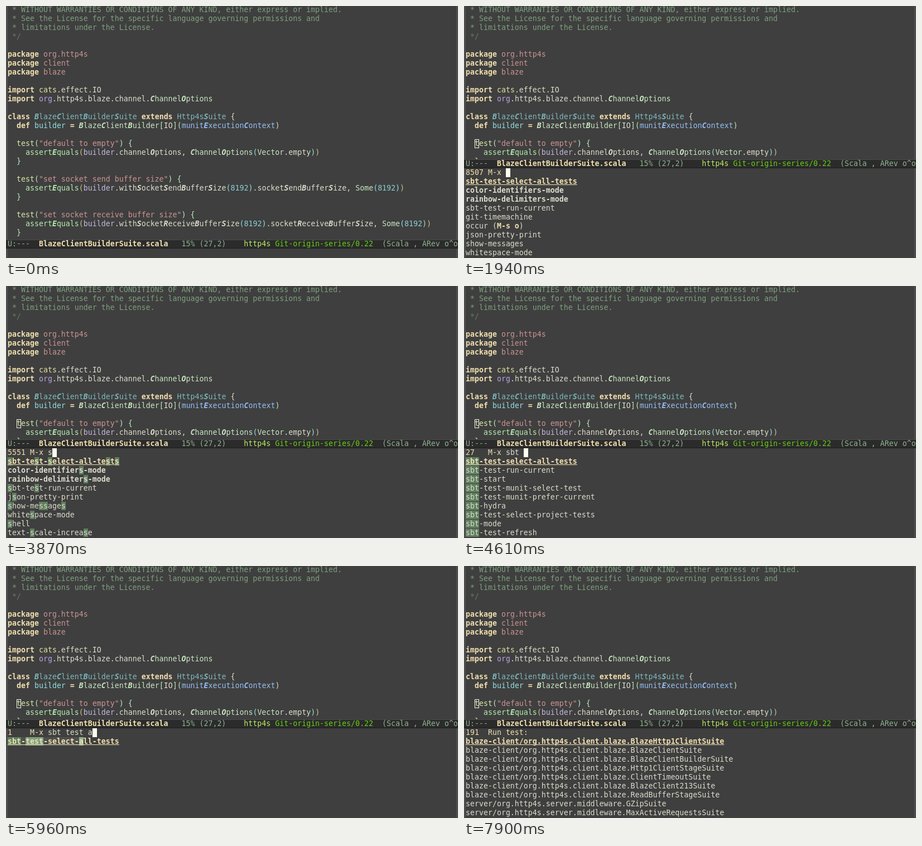
Recreate the animation shown at these times as an HTML page. Size 810 px wide and 452 px high, loop 8000 ms.

```html
<!DOCTYPE html>
<html lang="en">
<head>
<meta charset="utf-8">
<title>Running a test from the editor</title>
<style>
  html, body { margin: 0; width: 100%; height: 100%; overflow: hidden; background: #3f3f3f; }
  #stage { position: relative; width: 810px; height: 452px; overflow: hidden; background: #3f3f3f; }
  pre, .fringe, .edge, #point { position: absolute; margin: 0; }
  pre {
    font: 13.289px/16px "DejaVu Sans Mono", monospace;
    font-variant-ligatures: none;
    color: #dcdccc;
  }
  #code { left: 3px; top: -1px; }
  #mode {
    left: 0; width: 807px; height: 16px; padding-left: 3px; overflow: hidden;
    background: #2b2b2b; color: #8fb28f;
    box-shadow: inset 0 1px #4c4c4c, inset 0 -1px #1c1c1c;
  }
  #mini { left: 0; width: 807px; height: 180px; padding-left: 3px; background: #3f3f3f; }
  .fringe { top: 0; width: 3px; height: 452px; background: #4f4f4f; }
  .edge { left: 0; top: 451px; width: 810px; height: 1px; background: #463c3e; }

  /* syntax colours */
  i { font-style: normal; }
  em { font-style: italic; font-weight: bold; }
  b, .key { color: #f0dfaf; font-weight: bold; }
  .doc { color: #7f9f7f; }
  .end { color: #5f7f5f; }
  .str { color: #cc9393; }
  .type { color: #7cb8bb; }
  .def { color: #93e0e3; }
  .org { color: #b8a2e6; }
  .cats { color: #e2e0a4; }
  .opt { color: #c9e6c3; }
  .ctx { color: #94bff3; }
  .test { color: #d6e8a6; }
  .call { color: #b4ecae; }
  .obj { color: #c3b9dc; }
  .num { color: #8cd0d3; }
  .p2 { color: #bfebbf; }
  .p3 { color: #d0bf8f; }
  .p4 { color: #93e0e3; }
  .proj { color: #bdee62; }
  .git { color: #66cc14; }

  /* cursors */
  #point { left: 19px; top: 239px; width: 8px; height: 16px; box-sizing: border-box; }
  #point.hollow { border: 1px solid #ffffef; }
  #point.solid { background: #ffffef; }
  #point.solid::after {
    content: "t"; color: #3f3f3f;
    font: 13.289px/16px "DejaVu Sans Mono", monospace;
  }
  .caret { display: inline-block; width: 8px; height: 16px; vertical-align: top; }
  .caret.on { background: #ffffef; }

  /* candidates */
  .prompt { color: #f0dfaf; }
  .bold { font-weight: bold; }
  .pick { color: #f0dfaf; font-weight: bold; text-decoration: underline 1px; text-decoration-skip-ink: none; }
  .gap { background: #4f4f4f; }
  .m1 { background: #5f7f5f; }
  .m2 { background: #7f9f7f; }
  .m3 { background: #8fb28f; }
</style>
</head>
<body>
<div id="stage">
<pre id="code"><i class="doc"> * WITHOUT WARRANTIES OR CONDITIONS OF ANY KIND, either express or implied.
 * See the License for the specific language governing permissions and
 * limitations under the License.
</i><i class="end"> */</i>

<b>package</b> <i class="str">org.http4s</i>
<b>package</b> <i class="str">client</i>
<b>package</b> <i class="str">blaze</i>

<b>import</b> <i class="cats">cats</i>.effect.IO
<b>import</b> <i class="org">org</i>.http4s.blaze.channel.<i class="opt">ChannelOptions</i>

<b>class</b> <i class="type">BlazeClientBuilderSuite</i> <b>extends</b> <i class="type">Http4sSuite</i> {
  <b>def</b> <i class="def">builder</i> <b>=</b> <i class="opt">BlazeClientBuilder</i><i class="p2">[</i>IO<i class="p2">](</i><i class="ctx">munitExecutionContext</i><i class="p2">)</i>

  <i class="test">test</i><i class="p2">(</i><i class="str">"default to empty"</i><i class="p2">) {</i>
    <i class="call">assertEquals</i><i class="p3">(</i><i class="obj">builder</i>.channelOptions, <i class="opt">ChannelOptions</i><i class="p4">(</i><i class="opt">Vector</i>.empty<i class="p4">)</i><i class="p3">)</i>
  <i class="p2">}</i>

  <i class="test">test</i><i class="p2">(</i><i class="str">"set socket send buffer size"</i><i class="p2">) {</i>
    <i class="call">assertEquals</i><i class="p3">(</i><i class="obj">builder</i>.withSocketSendBufferSize<i class="p4">(</i><i class="num">8192</i><i class="p4">)</i>.socketSendBufferSize, <i class="opt">Some</i><i class="p4">(</i><i class="num">8192</i><i class="p4">)</i><i class="p3">)</i>
  <i class="p2">}</i>

  <i class="test">test</i><i class="p2">(</i><i class="str">"set socket receive buffer size"</i><i class="p2">) {</i>
    <i class="call">assertEquals</i><i class="p3">(</i><i class="obj">builder</i>.withSocketReceiveBufferSize<i class="p4">(</i><i class="num">8192</i><i class="p4">)</i>.socketReceiveBufferSize, <i class="opt">Some</i><i class="p4">(</i><i class="num">8192</i><i class="p4">)</i><i class="p3">)</i>
  <i class="p2">}</i></pre>
<div id="point"></div>
<pre id="mini"></pre>
<div class="fringe" style="left:0"></div>
<div class="fringe" style="left:807px"></div>
<pre id="mode">U:---  <b>BlazeClientBuilderSuite.scala</b>   15% (27,2)    <i class="proj">http4s</i> <i class="git">Git-origin-series/0.22</i>  (Scala , ARev o^o</pre>
<div class="edge"></div>
</div>
<script>
const LOOP = 8000;
const [code, point, mini, mode] = ['code', 'point', 'mini', 'mode'].map(id => document.getElementById(id));

// Inner capitals of camel-case names stand out in bold italics.
code.innerHTML = code.innerHTML.replace(/(?<=[a-z])[A-Z]|\b[A-Z](?=[a-z]+[A-Z])/g, '<em>$&</em>');

const sbt = names => names.split(' ').map(n => 'sbt-' + n);
const recent = ['sbt-test-select-all-tests', 'color-identifiers-mode', 'rainbow-delimiters-mode',
  'sbt-test-run-current'];
const all = [...recent, 'git-timemachine', 'occur (<b>M-s o</b>)', 'json-pretty-print',
  'show-messages', 'whitespace-mode'];
const withS = [...recent, 'json-pretty-print', 'show-messages', 'whitespace-mode', 'shell',
  'text-scale-increase'];
const withSbt = sbt('test-select-all-tests test-run-current start test-munit-select-test ' +
  'test-munit-prefer-current hydra test-select-project-tests mode test-refresh');
const withTe = sbt('test-select-all-tests test-run-current test-munit-select-test ' +
  'test-munit-prefer-current test-select-project-tests test-refresh do-test paste-region');
const withT = [...withTe.slice(0, 2), 'sbt-start', ...withTe.slice(2)];
const withTes = withTe.slice(0, 7);
const only = withTe.slice(0, 1);
const suites = [
  ...['BlazeHttp1Client', 'BlazeClient', 'BlazeClientBuilder', 'Http1ClientStage', 'ClientTimeout',
    'BlazeClient213', 'ReadBufferStage'].map(n => `blaze-client/org.http4s.client.blaze.${n}Suite`),
  ...['GZip', 'MaxActiveRequests'].map(n => `server/org.http4s.server.middleware.${n}Suite`),
];

const editing = on => ({ point: on ? 'solid' : '' });
const asking = (count, query, list, on = true, label = 'M-x ') =>
  ({ point: 'hollow', prompt: String(count).padEnd(5) + label, query, list, on });

const steps = [
  [0, editing(false)],
  [300, editing(true)],
  [890, editing(false)],
  [1340, editing(true)],
  [1790, editing(false)],
  [1940, asking(8507, '', all)],
  [2380, asking(8507, '', all, false)],
  [2980, asking(8507, '', all)],
  [3430, asking(8507, '', all, false)],
  [3870, asking(5551, 's', withS)],
  [4020, asking(31, 'sb', withSbt)],
  [4320, asking(27, 'sbt', withSbt)],
  [4610, asking(27, 'sbt ', withSbt)],
  [4910, asking(14, 'sbt t', withT)],
  [5060, asking(8, 'sbt te', withTe)],
  [5360, asking(7, 'sbt tes', withTes)],
  [5660, asking(7, 'sbt test ', withTes)],
  [5960, asking(1, 'sbt test a', only)],
  [6410, asking(1, 'sbt test al', only)],
  [6850, asking(1, 'sbt test all', only)],
  [7300, { point: 'hollow', list: [] }],
  [7450, asking(191, '', suites, true, 'Run test: ')],
  [7900, asking(191, '', suites, false, 'Run test: ')],
];

// Words of the query get their own shade, the text between them a faint one.
function mark(name, query) {
  const words = query.trim().split(' ');
  if (!words[0]) return name;
  const pattern = new RegExp(words.map(w => `(${w})`).join('(.*?)'), 'g');
  return name.replace(pattern, (...found) =>
    found.slice(1, words.length * 2).map((text, i) =>
      `<i class="${i % 2 ? 'gap' : 'm' + (i / 2 + 1)}">${text}</i>`).join(''));
}

function row(name, i, query) {
  const style = i === 0 ? 'pick' : /^(color|rainbow)/.test(name) ? 'bold' : '';
  return `\n<i class="${style}">${mark(name, query)}</i>`;
}

function show({ point: cursor, prompt, query, list, on }) {
  point.className = cursor;
  const top = list ? 275 : 419;
  mode.style.top = top + 'px';
  mini.style.top = top + 16 + 'px';
  mini.innerHTML = prompt
    ? `<i class="prompt">${prompt}</i>${query}<i class="caret ${on ? 'on' : ''}"></i>` +
      list.map((name, i) => row(name, i, query)).join('')
    : '';
}

let shown;
function frame() {
  const now = performance.now() % LOOP;
  const step = steps.findLast(([start]) => start <= now);
  if (step !== shown) show((shown = step)[1]);
  requestAnimationFrame(frame);
}
frame();
</script>
</body>
</html>
```
